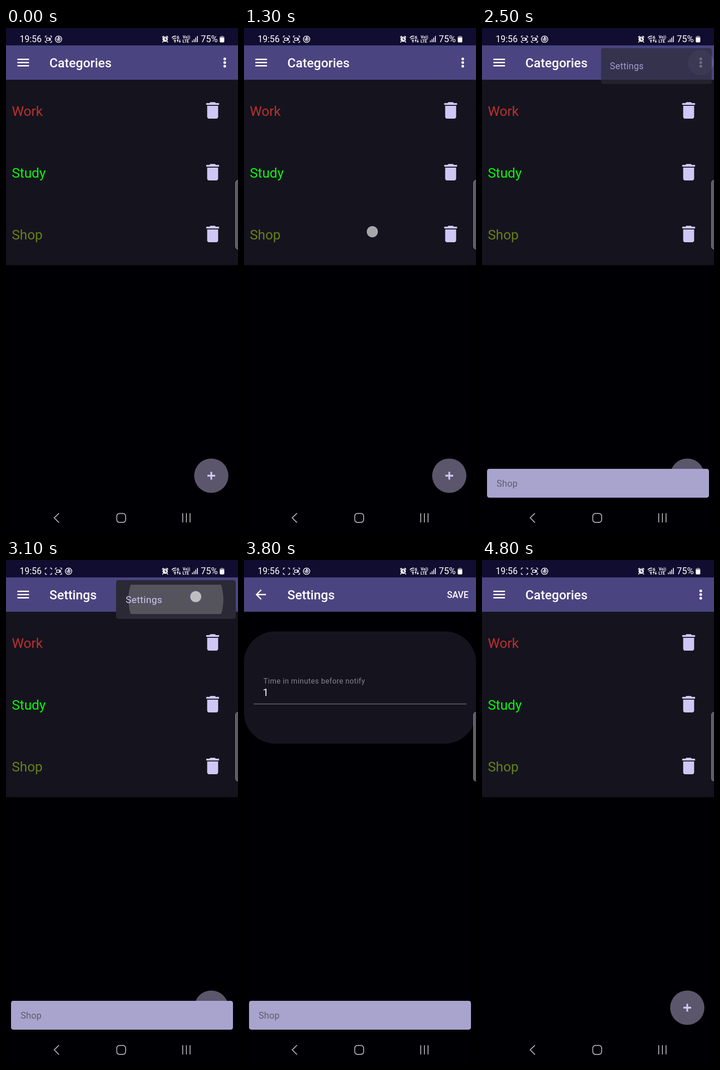
Recreate the animation shown at these times as an HTML page. Size 508x1101 px, loop 5.1 s.

```html
<!DOCTYPE html>
<html lang="en">
<head>
<meta charset="utf-8">
<title>Categories</title>
<style>
html, body { margin: 0; width: 100%; height: 100%; overflow: hidden; background: #000004; }
svg { display: block; width: 508px; height: 1101px; font-family: Roboto, sans-serif; }
.row { font-size: 29.6px; }
.bar { font-size: 28px; font-weight: 500; }
.line { fill: none; stroke: #fff; }
</style>
</head>
<body>
<svg viewBox="0 0 508 1101">
  <defs>
    <path id="trash" fill="#cfc7f6" d="M6 19c0 1.1.9 2 2 2h8c1.1 0 2-.9 2-2V7H6v12zM19 4h-3.5l-1-1h-5l-1 1H5v2h14V4z"/>
    <path id="corners" class="line" stroke-width="1.4" d="M-3.5-7H-5.5Q-7-7-7-5.5V-3.5M3.5-7H5.5Q7-7 7-5.5V-3.5M-3.5 7H-5.5Q-7 7-7 5.5V3.5M3.5 7H5.5Q7 7 7 5.5V3.5"/>
    <path id="camera" class="line" stroke-width="1.4" d="M-4.3-2.8H1.8V2.8H-4.3ZM1.8-.4 4.6-2.4V2.4L1.8 .4"/>
    <clipPath id="item"><rect x="241" y="54" width="262" height="64"/></clipPath>
  </defs>
  <rect width="508" height="1101" fill="#000004"/>

  <g id="list">
    <rect y="113" width="508" height="405" fill="#15141e"/>
    <g class="row">
      <text x="12.8" y="191.5" fill="#bd2f2d">Work</text>
      <text x="12.8" y="326.5" fill="#0af70a">Study</text>
      <text x="12.8" y="461.5" fill="#66801a">Shop</text>
    </g>
    <use href="#trash" transform="translate(428.5 156) scale(2)"/>
    <use href="#trash" transform="translate(428.5 291) scale(2)"/>
    <use href="#trash" transform="translate(428.5 426) scale(2)"/>
    <circle cx="449.5" cy="978" r="37.5" fill="#5b566b"/>
    <path d="M441 978H458M449.5 969.5V986.5" stroke="#cfc7f6" stroke-width="3.8"/>
  </g>

  <g id="settings">
    <rect y="156" width="508" height="245" rx="68" fill="#15141e"/>
    <text x="42.5" y="270" font-size="16" letter-spacing=".5" fill="#84828f">Time in minutes before notify</text>
    <text x="41" y="296.5" font-size="22.5" fill="#fff">1</text>
    <path d="M21.5 314.5H487" stroke="#72707a" stroke-width="1.5"/>
  </g>

  <rect width="508" height="39" fill="#110d30"/>
  <rect y="38" width="508" height="75" fill="#4a4580"/>
  <text id="title" class="bar" x="95" y="86" fill="#fff"></text>
  <circle id="backRipple" cx="39" cy="79" r="22.5" fill="#fff"/>
  <path id="nav" class="line" stroke-width="2.8"/>
  <g id="overflow" fill="#fff">
    <circle cx="479" cy="67.5" r="2.9"/><circle cx="479" cy="75.5" r="2.9"/><circle cx="479" cy="83.5" r="2.9"/>
  </g>
  <circle id="menuRipple" cx="479" cy="75.5" r="28" fill="#fff"/>
  <text id="save" x="444.5" y="83" font-size="19.3" font-weight="500" fill="#fff">SAVE</text>

  <g id="snack">
    <rect x="11" y="963" width="486" height="63" rx="5" fill="#a9a4cd"/>
    <text x="32" y="1002" font-size="19.7" letter-spacing=".35" fill="#5e5a6c">Shop</text>
  </g>
  <path d="M509 332.5H508Q502.5 333 502.5 339V476Q502.5 483 508 483H509" fill="#5c5b64" stroke="#8d8c94"/>

  <g id="popup">
    <rect x="241" y="44" width="262" height="84.5" rx="5" fill="#2a2935"/>
    <g clip-path="url(#item)"><circle id="itemRipple" cx="372" cy="86" fill="#fff"/></g>
    <text x="262" y="94" font-size="21.1" letter-spacing=".4" fill="#cfc7f6">Settings</text>
  </g>

  <g fill="#fff">
    <text x="30" y="31" font-size="19.3">19:56</text>
    <use href="#corners" x="93" y="24.5"/>
    <use id="blink" href="#camera" x="93" y="24.5"/>
    <g id="second"><use href="#corners" x="115" y="24.5"/><use href="#camera" x="115" y="24.5"/></g>
    <g id="record">
      <circle class="line" cy="24.5" r="7" stroke-width="1.6"/>
      <path class="line" stroke-width="1.4" d="M-3 22.5A3.6 3.6 0 1 0 1 21"/>
      <circle cy="24.5" r="1.8"/><path d="M-1 18.5 2.5 21-1 23.5Z"/>
    </g>
    <circle cx="348.5" cy="24.5" r="5.8"/>
    <path class="line" stroke-width="2" d="M342 20.5 345.5 17.5M355 20.5 351.5 17.5M344.5 29 342.5 31.5M352.5 29 354.5 31.5"/>
    <path d="M348.5 20.5V25L351.5 26.5" fill="none" stroke="#110d30" stroke-width="1.4"/>
    <path class="line" stroke-width="1.7" d="M363 21.5Q368 16.5 373 18M365 24.5Q368.5 21 373 22.5M367.5 27.5Q370 25.5 372 27.5"/>
    <circle cx="370" cy="30" r="1.5"/>
    <text x="374" y="23.5" font-size="9.5" font-weight="700">6</text>
    <path class="line" stroke-width="1.2" d="M376 31V25.5M374.3 27.5 376 25.5 377.7 27.5M380.5 25V31M378.8 29 380.5 31 382.2 29"/>
    <text x="387" y="23" font-size="8.6" font-weight="700">Vo))</text>
    <text x="386.5" y="32" font-size="8.8" font-weight="700">LTE</text>
    <path class="line" stroke-width="1.8" d="M408.2 31V27.5M411.8 31V24.5M415.4 31V21M419 31V17.5"/>
    <text x="426.5" y="31" font-size="20">75%</text>
    <path d="M468 21V19.5Q468 18 470 18H471V17H475V18H476Q478 18 478 19.5V21Z" fill="#85839a"/>
    <path d="M468 21H478V29Q478 31.5 475.5 31.5H470.5Q468 31.5 468 29Z"/>
  </g>
  <g fill="none" stroke="#b4b4b6" stroke-width="1.9">
    <path d="M116 1060 105.5 1070 116 1080.5M387 1060V1080M395 1060V1080M403 1060V1080"/>
    <rect x="242.5" y="1060.5" width="19.5" height="19.5" rx="6"/>
  </g>
  <circle id="touch" r="11.5" fill="#fff" fill-opacity=".62" stroke="#c4c0e6" stroke-opacity=".7" stroke-width="1.4"/>
</svg>
<script>
const LOOP = 5100, STEP = 100;
const $ = id => document.getElementById(id);
const set = (id, attrs) => { for (const k in attrs) $(id).setAttribute(k, attrs[k]); };
const show = (id, on) => set(id, { opacity: +on });
const ramp = (t, a, b) => Math.min(1, Math.max(0, (t - a) / (b - a)));
const ease = x => (1 - Math.cos(Math.PI * x)) / 2;
const lerp = (a, b, p) => a + (b - a) * p;
const within = (t, a, b) => t >= a && t < b;

// start, end, x, y, drift x, drift y
const touches = [
  [900, 1100, 131, 911, 3, 10],
  [1300, 1500, 281, 445, 0, 0],
  [2200, 2400, 479, 79, 0, 0],
  [3000, 3200, 415.5, 80, 0, 0],
  [4200, 4300, 41, 84.5, 0, 0]
];

// Hamburger (p = 0) spinning into a left arrow (p = 1)
function drawNav(p, mirrored) {
  const angle = lerp(0, Math.PI / 4, p);
  const size = lerp(25.4, 16, p), shaft = lerp(25.4, 22.6, p);
  const offset = lerp(7, -1, p), edge = -shaft / 2;
  const w = size * Math.cos(angle), h = size * Math.sin(angle);
  set('nav', {
    d: `M${edge + p} 0h${shaft - 2 * p}M${edge} ${offset}l${w} ${h}M${edge} ${-offset}l${w} ${-h}`,
    transform: `translate(37.6 75.5) rotate(${(mirrored ? 180 : -180) * (1 - p)})`
  });
}

const scaleAt = (x, y, s) => `translate(${x} ${y}) scale(${s}) translate(${-x} ${-y})`;

function render(t) {
  const inSettings = within(t, 3200, 4200);
  show('list', !inSettings);
  show('settings', inSettings);
  show('save', inSettings);
  show('overflow', !within(t, 3100, 4200));
  $('title').textContent = within(t, 3100, 4200) ? 'Settings' : 'Categories';

  const back = t >= 4200;
  drawNav(back ? 1 - ease(ramp(t, 4200, 4500)) : ease(ramp(t, 3100, 3400)), back);
  set('backRipple', { opacity: back ? .16 * (1 - ramp(t, 4200, 4600)) : 0 });
  set('menuRipple', { opacity: t >= 2200 ? .16 * (1 - ramp(t, 2400, 2800)) : 0 });

  const snackIn = ramp(t, 1450, 1650);
  set('snack', {
    opacity: snackIn * (1 - ramp(t, 4350, 4500)),
    transform: scaleAt(254, 994.5, lerp(.8, 1, ease(snackIn)))
  });

  const popIn = ramp(t, 2300, 2600);
  set('popup', {
    opacity: popIn * (1 - ramp(t, 3110, 3400)),
    transform: scaleAt(503, 44, lerp(.7, 1, ease(popIn)))
  });
  set('itemRipple', {
    r: t < 3000 ? 0 : lerp(50, 104, ramp(t, 3000, 3100)),
    opacity: .2 * (1 - ramp(t, 3100, 3250))
  });

  const blinkOn = within(t % 1000, 300, 800);
  show('blink', t < 100 || blinkOn);
  show('second', t >= 100);
  set('record', { transform: `translate(${t < 100 ? 115 : 137} 0)` });

  const touch = touches.find(([a, b]) => within(t, a, b));
  show('touch', touch);
  show('touch', !!touch);
  if (touch) {
    const [a, , x, y, dx, dy] = touch, k = ramp(t, a, a + STEP);
    set('touch', { cx: x + dx * k, cy: y + dy * k });
  }
}

function frame() {
  render(Math.floor(performance.now() % LOOP / STEP) * STEP);
  requestAnimationFrame(frame);
}
frame();
</script>
</body>
</html>
```
